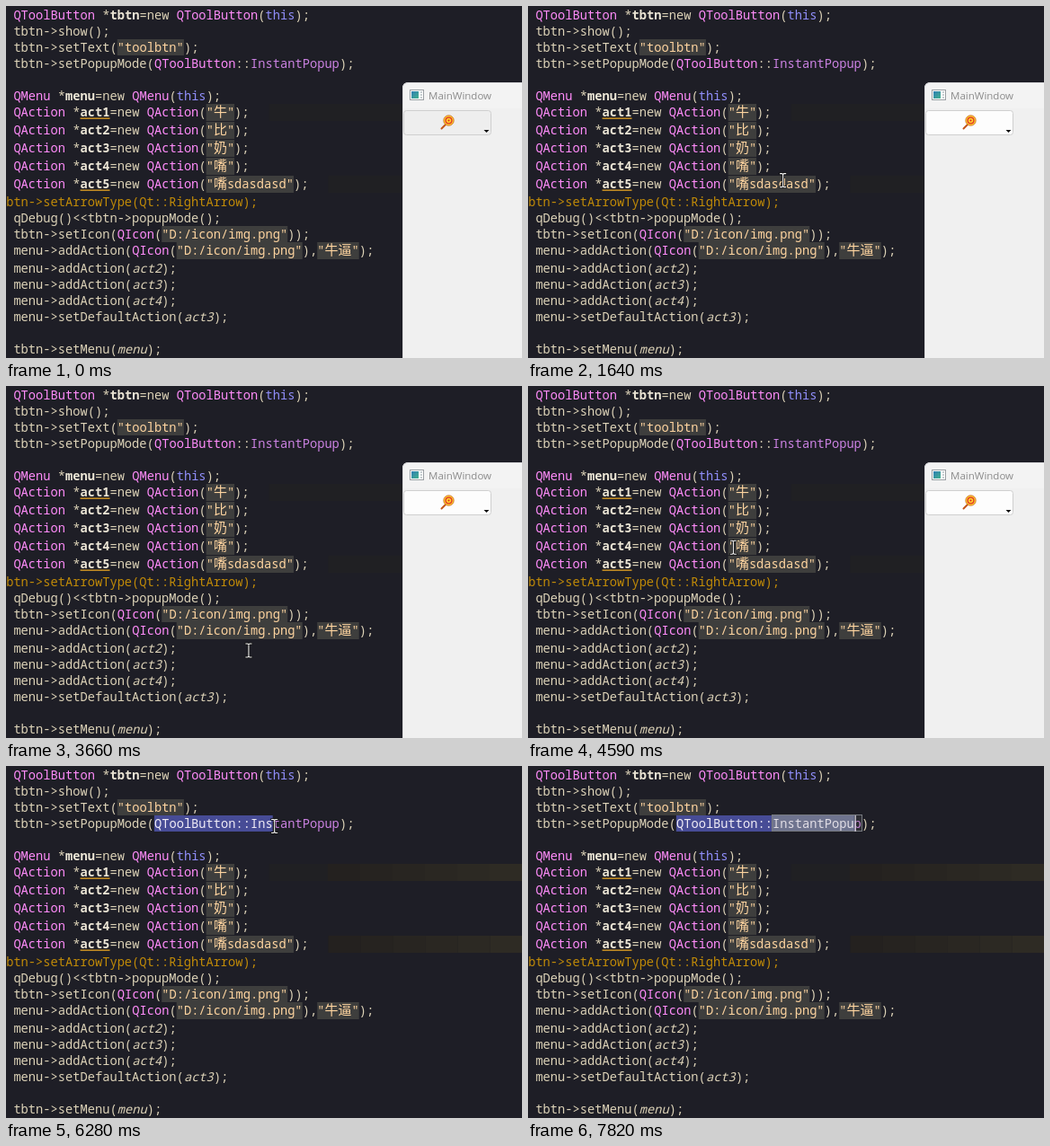
Write an HTML page that moves like this. It is 574 px wide and 392 px high and loops after 8000 ms.

```html
<!DOCTYPE html>
<html lang="en">
<head>
<meta charset="utf-8">
<title>Tool button code</title>
<style>
  html, body { margin: 0; width: 100%; height: 100%; overflow: hidden; background: #1e1e26; }
  svg { display: block; width: 574px; height: 392px; }
  .code text { font: 13.73px "Noto Sans Mono", "DejaVu Sans Mono", monospace; white-space: pre; fill: #ddd3b8; }
  .code .type { fill: #ff8cfa; }
  .code .key { fill: #908efa; }
  .code .enum { fill: #cb82e2; }
  .code .str { fill: #ffd5a0; }
  .code .note { fill: #c08a08; }
  .code .decl { font-weight: 700; fill: #ece6d6; }
  .code .arg { font-style: italic; }
  .code .cjk { font: 15px "Noto Sans CJK SC", "Noto Sans CJK", sans-serif; }
  #picked text { fill: #f0ecf6; }
  .title { font: 11.5px "Open Sans", "Noto Sans", sans-serif; fill: #8a8a8a; }
</style>
</head>
<body>
<svg viewBox="0 0 574 392" xmlns="http://www.w3.org/2000/svg">
  <defs>
    <clipPath id="range"><rect id="rangeBox" x="164.9" y="55" width="0" height="18"/></clipPath>
    <linearGradient id="pane" x2="1" y2="1">
      <stop stop-color="#2f7fb5"/><stop offset="1" stop-color="#43b08c"/>
    </linearGradient>
  </defs>
  <rect width="574" height="392" fill="#1e1e26"/>
  <g id="bands" fill="#202023"></g>
  <g id="tint"></g>
  <g id="code" class="code"></g>
  <g clip-path="url(#range)">
    <rect x="164" y="55" width="210" height="18" fill="#474c96"/>
    <rect id="match" x="271.5" y="55" width="101" height="18" fill="#6b7190"/>
    <g id="picked" class="code"></g>
  </g>
  <rect id="outline" x="271.5" y="54.5" width="100" height="18" fill="#8a8a8a" fill-opacity=".14" stroke="#777a80"/>
  <rect id="caret" x="363.5" y="55" width="1.3" height="18" fill="#d8d6e0"/>

  <g id="window">
    <path d="M441 392V92q0-7 7-7H574V392z" fill="#f0f0f0"/>
    <path d="M441 114V92q0-7 7-7H574V114z" fill="#f3f3f3"/>
    <path d="M441.5 392V92q0-6.5 7-6.5H574" fill="none" stroke="#c9c9cb" stroke-opacity=".6"/>
    <rect x="449.5" y="93.5" width="15" height="11" fill="#fff" stroke="#9a9fa3"/>
    <rect x="451" y="95" width="8" height="8" fill="url(#pane)"/>
    <path d="M461 96h2M461 99h2M461 102h2" stroke="#8e9aa0"/>
    <text class="title" x="470" y="104">MainWindow</text>
    <rect id="button" x="442.5" y="116.5" width="97" height="27" rx="3" stroke="#cfcfcf"/>
    <path d="M489 132L484.5 136.5" stroke="#c4571c" stroke-width="2" stroke-linecap="round"/>
    <circle cx="492.5" cy="127.5" r="5.7" fill="#ffcf2e" stroke="#c8641c" stroke-width=".8"/>
    <circle cx="492.5" cy="127.5" r="3.4" fill="none" stroke="#e0322a" stroke-width="1.3"/>
    <circle cx="492.5" cy="127.5" r="1" fill="#d8261e"/>
    <path d="M531.5 138h6l-3 3z" fill="#111"/>
  </g>

  <g id="beam" fill="none" stroke-linecap="square">
    <path d="M-3-7.5H-1L0-6.5 1-7.5H3M0-6.5V6.5M-3 7.5H-1L0 6.5 1 7.5H3" stroke="#111" stroke-width="2.6"/>
    <path d="M-3-7.5H-1L0-6.5 1-7.5H3M0-6.5V6.5M-3 7.5H-1L0 6.5 1 7.5H3" stroke="#f4f4f4" stroke-width="1.1"/>
  </g>
  <path id="arrow" d="M0 0V13L3 10.2 5 15 7.2 14 5.2 9.4H9.3z" fill="#fff" stroke="#222" stroke-width=".8"/>
</svg>
<script>
const $ = id => document.getElementById(id);
const LOOP = 8000, LEFT = 8.4, ADVANCE = 8.24, WIDE = 15, STAGE = 574;

const code = `QToolButton *tbtn=new QToolButton(this);
tbtn->show();
tbtn->setText("toolbtn");
tbtn->setPopupMode(QToolButton::InstantPopup);

QMenu *menu=new QMenu(this);
QAction *act1=new QAction("牛");
QAction *act2=new QAction("比");
QAction *act3=new QAction("奶");
QAction *act4=new QAction("嘴");
QAction *act5=new QAction("嘴sdasdasd");
//tbtn->setArrowType(Qt::RightArrow);
qDebug()<<tbtn->popupMode();
tbtn->setIcon(QIcon("D:/icon/img.png"));
menu->addAction(QIcon("D:/icon/img.png"),"牛逼");
menu->addAction(act2);
menu->addAction(act3);
menu->addAction(act4);
menu->setDefaultAction(act3);

tbtn->setMenu(menu);`;

const rules = [
  ['note', /\/\/.*/y],
  ['str', /"[^"]*"/y],
  ['type', /Q(ToolButton|Menu|Action|Icon)\b/y],
  ['key', /this\b/y],
  ['enum', /InstantPopup/y],
  ['decl', /(?<=\*)\w+/y],
  ['arg', /(?<=\()(act\d|menu)(?=\))/y],
  ['', /\w+|\W/y]
];

function tokens(line) {
  const out = [];
  for (let at = 0; at < line.length;) {
    for (const [kind, rule] of rules) {
      rule.lastIndex = at;
      const hit = rule.exec(line);
      if (!hit) continue;
      const last = out[out.length - 1];
      if (!kind && last && !last[0]) last[1] += hit[0];
      else out.push([kind, hit[0]]);
      at += hit[0].length;
      break;
    }
  }
  return out;
}

function add(parent, tag, attrs, text) {
  const el = document.createElementNS('http://www.w3.org/2000/svg', tag);
  for (const name in attrs) el.setAttribute(name, attrs[name]);
  if (text) el.textContent = text;
  parent.append(el);
}

const isWide = s => /[\u4e00-\u9fff]/.test(s);
const widthOf = s => [...s].reduce((sum, c) => sum + (isWide(c) ? WIDE : ADVANCE), 0);
const unused = name => code.split(name).length === 2;

// Pale strip behind a warning, browner and lighter to the right
function drawBand(x, y) {
  add($('bands'), 'rect', { x, y, width: STAGE - x, height: 19 });
  const from = Math.max(x, 358), step = 36;
  for (let i = 0; from + i * step < STAGE; i++) {
    const fill = `rgb(${36 + 2 * i},${33 + 2 * i},${31 + i})`;
    add($('tint'), 'rect', { x: from + i * step, y, width: step, height: 19, fill });
  }
}

function drawLine(parent, line, y) {
  const height = isWide(line) ? 19 : 18;
  let x = LEFT, warn = false;
  for (let [kind, text] of tokens(line)) {
    if (kind === 'note') {   // scrolled partly out of view
      text = text.slice(3);
      x -= ADVANCE;
    }
    const width = widthOf(text);
    if (kind === 'str') add(parent, 'rect', { x, y: y - 14, width, height, fill: '#3e3e3d' });
    if (kind === 'decl' && unused(text)) {
      warn = true;
      add(parent, 'rect', { x, y: y + 1.5, width, height: 1.3, fill: '#e6a423' });
    }
    for (const part of text.match(/[\u4e00-\u9fff]+|[^\u4e00-\u9fff]+/g)) {
      add(parent, 'text', { x, y, class: kind + (isWide(part) ? ' cjk' : '') }, part);
      x += widthOf(part);
    }
  }
  if (warn) drawBand(x + 22, y - 14);
}

let baseline = 15;
for (const line of code.split('\n')) {
  drawLine($('code'), line, baseline);
  if (line.includes('InstantPopup')) drawLine($('picked'), line, baseline);
  baseline += isWide(line) ? 20 : 18;
}

// Pointer stops: time, x, y, and how far the way there sags
const stops = [
  [320, 486, 152, 0], [1170, 219, 190, 175], [1640, 283.5, 194, 55], [1780, 305, 208, 0],
  [2810, 149.5, 235, 40], [3560, 294, 250, 45], [4060, 175, 265, 70], [4320, 215, 180, 0],
  [4590, 228.5, 180, 0], [5060, 175, 69, 0], [5250, 158, 62, 0], [5910, 166.5, 61, 0],
  [6280, 298.5, 67, 0], [6660, 366, 66, 0], [7480, 365, 67, 0], [7640, 422, 207, 0]
];

function pointer(t) {
  const i = stops.findIndex(s => s[0] > t);
  if (i < 1) return null;
  const [t0, x0, y0] = stops[i - 1], [t1, x1, y1, sag] = stops[i];
  const k = (t - t0) / (t1 - t0);
  return [x0 + (x1 - x0) * k, y0 + (y1 - y0) * k + sag * Math.sin(Math.PI * k)];
}

const show = (id, on) => $(id).setAttribute('visibility', on ? 'visible' : 'hidden');

function draw(t) {
  const at = pointer(t);
  const overWindow = at && at[0] > 441;
  show('beam', at && !overWindow);
  show('arrow', overWindow);
  if (at) $(overWindow ? 'arrow' : 'beam').setAttribute('transform', `translate(${at})`);

  const behind = t >= 5990;
  show('window', !behind);
  show('tint', behind);
  $('button').setAttribute('fill', t < 400 ? '#eeeeee' : '#fdfdfd');

  // Selection snaps to whole columns while dragging.
  const first = 19, last = 43;
  let col = first;
  if (t >= 6660) col = last;
  else if (behind) col = Math.min(last, Math.max(first, Math.round((at[0] - LEFT) / ADVANCE)));
  $('rangeBox').setAttribute('width', (col - first) * ADVANCE);

  const matched = t >= 7030;
  show('match', matched);
  show('outline', matched);
  show('caret', t >= 6750 && (t < 7310 || t >= 7820));
}

const start = performance.now();
function tick() {
  draw((performance.now() - start) % LOOP);
  requestAnimationFrame(tick);
}
tick();
</script>
</body>
</html>
```
